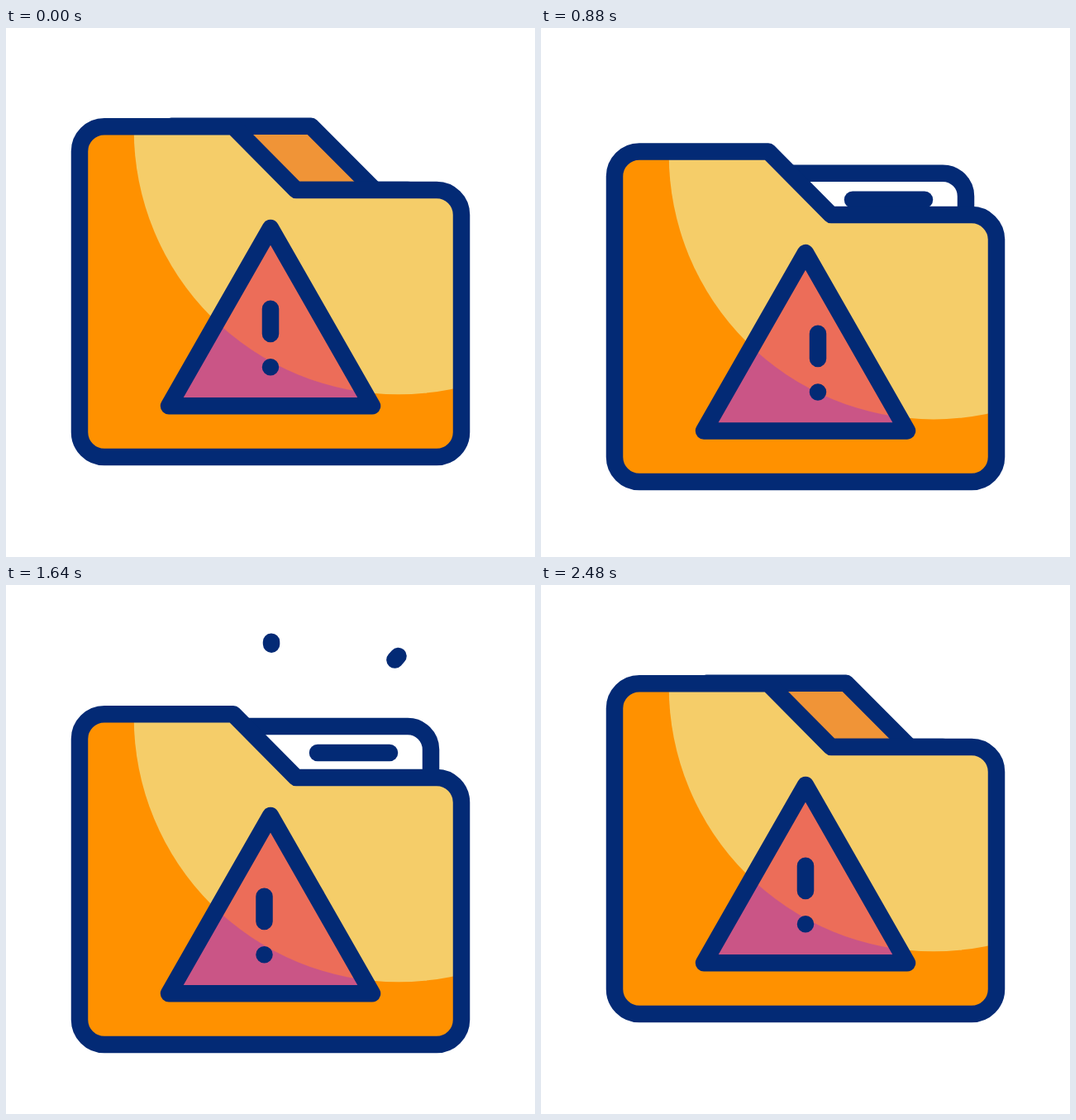
An HTML page that plays this animation: 640x640 px, repeating every 3000 ms.

```html
<!DOCTYPE html>
<html lang="en">
<head>
<meta charset="utf-8">
<title>Folder warning</title>
<style>
  html, body { margin: 0; width: 100%; height: 100%; overflow: hidden; background: #fff; }
  svg { display: block; width: 100vw; height: 100vh; }
  .ink { stroke: #032a75; stroke-width: 20.5; stroke-linecap: round; stroke-linejoin: round; fill: none; }
</style>
</head>
<body>
<svg viewBox="0 0 640 640">
  <defs>
    <path id="body" d="M119 119.3H275L351 196H521A30 30 0 0 1 551 226V489A30 30 0 0 1 521 519H119A30 30 0 0 1 89 489V149.3A30 30 0 0 1 119 119.3Z"/>
    <path id="sign" d="M320 242L443 457.3H197Z"/>
    <clipPath id="inBody"><use href="#body"/></clipPath>
    <clipPath id="inSign"><use href="#sign"/></clipPath>
  </defs>

  <path id="tab" class="ink" style="fill:#f09437" d="M200 118.8H369L446 196V260H200Z"/>

  <g id="paper" class="ink">
    <path fill="#fff" d="M200 196H486A28 28 0 0 1 514 224V320H200Z"/>
    <path d="M377 228H464"/>
  </g>

  <g id="folder">
    <use href="#body" fill="#ff9100"/>
    <circle cx="475" cy="123" r="320.3" fill="#f5cd69" clip-path="url(#inBody)"/>
    <use href="#body" class="ink"/>
    <use href="#sign" fill="#ca5586"/>
    <circle cx="475" cy="123" r="320.3" fill="#ec6d59" clip-path="url(#inSign)"/>
    <use href="#sign" class="ink"/>
    <path id="mark" class="ink" d="M320 339.7V370M320 410.3V410.31"/>
  </g>

  <path class="ink spark"/>
  <path class="ink spark"/>
  <path class="ink spark"/>
</svg>
<script>
  const LOOP = 3000, STEP = 40, DROP = 37;
  const SHAKE = 55, SHAKE_START = 800, SWING = 880 / 3;
  const sparks = [
    { from: [193, 115], to: [166.5, 85.5], delay: -70 },
    { from: [322, 111], to: [321, 68.7], delay: 0 },
    { from: [444, 120], to: [474.5, 86], delay: 25 }
  ];
  const sparkPaths = document.querySelectorAll('.spark');
  const [tab, paper, folder, mark] =
    ['tab', 'paper', 'folder', 'mark'].map(id => document.getElementById(id));

  const progress = (t, start, end) => Math.min(1, Math.max(0, (t - start) / (end - start)));
  const ease = (p, power) => p < 0.5
    ? (2 * p) ** power / 2
    : 1 - (2 - 2 * p) ** power / 2;
  const move = (node, x, y) => node.setAttribute('transform', `translate(${x} ${y})`);

  // One linear zigzag: centre, right, left, centre
  function shakeAt(t) {
    const p = progress(t, SHAKE_START, SHAKE_START + 3 * SWING) * 3;
    return SHAKE * (p < 1 ? p : p < 2 ? 3 - 2 * p : p - 3);
  }

  function drawSpark({ from, to, delay }, path, t) {
    const head = ease(progress(t - delay, 1070, 1420), 2);
    const tail = ease(progress(t - delay, 1360, 1704), 2);
    const point = k => from.map((v, i) => v + (to[i] - v) * k).join(' ');
    path.setAttribute('d', head > tail ? `M${point(tail)}L${point(head)}` : '');
  }

  function draw(now) {
    const t = Math.floor(now % LOOP / STEP) * STEP;
    const open = ease(progress(t, 560, 1060), 3) - ease(progress(t, 1700, 2440), 3);
    move(folder, 0, DROP * open);
    move(tab, 0, 2 * DROP * open);
    move(paper, 0, -25 * open);
    move(mark, shakeAt(t), 0);
    sparks.forEach((spark, i) => drawSpark(spark, sparkPaths[i], t));
  }

  function tick() {
    draw(performance.now());
    requestAnimationFrame(tick);
  }
  tick();
</script>
</body>
</html>
```
